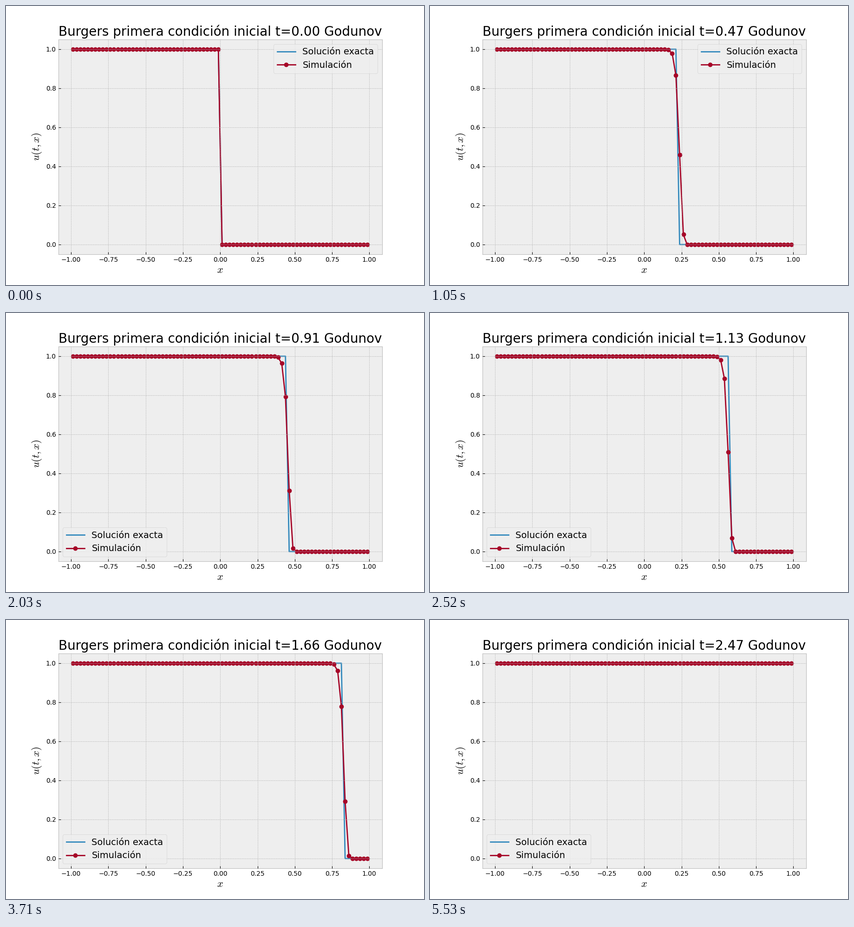
These frames come from a looping animation (900 px wide and 600 px high, 5.6 s). A matplotlib script:

```python
import numpy as np
import matplotlib.pyplot as plt
from matplotlib.animation import FuncAnimation

plt.style.use("bmh")
plt.rcParams.update({"font.family": "DejaVu Sans", "font.size": 10,
                     "axes.axisbelow": False})

CELLS, FRAMES, STEPS_PER_FRAME = 80, 80, 5
T_END = 2.5
DX = 2 / CELLS
N_STEPS = FRAMES * STEPS_PER_FRAME
RATIO = T_END / (N_STEPS + 1) / DX      # dt / dx of the scheme
times = np.linspace(0, T_END, N_STEPS)[::STEPS_PER_FRAME]
x = -1 + DX * (np.arange(CELLS) + 0.5)


def exact(t):
    """Shock travelling at speed 1/2."""
    return np.where(x < t / 2, 1.0, 0.0)


def godunov_step(u):
    """Upwind Godunov update for u >= 0 with inflow u = 1."""
    flux = np.concatenate(([1.0], u)) ** 2 / 2
    return u - RATIO * np.diff(flux)


def simulate():
    u = exact(0)
    history = []
    for _ in range(FRAMES):
        history.append(u)
        for _ in range(STEPS_PER_FRAME):
            u = godunov_step(u)
    return history


history = simulate()

fig, ax = plt.subplots(figsize=(9, 6), dpi=100, facecolor="white")
exact_line, = ax.plot(x, exact(0), label="Solución exacta")
sim_line, = ax.plot(x, history[0], "-o", label="Simulación")
margin = 0.05 * (x[-1] - x[0])
ax.set_xlim(x[0] - margin, x[-1] + margin)
ax.set_ylim(-0.05, 1.05)
ax.set_xlabel("$x$", fontsize=16)
ax.set_ylabel("$u(t,x)$", fontsize=16)
title = ax.set_title("", fontsize=20)
ax.legend(loc="best", fontsize=14)


def update(i):
    t = times[i]
    exact_line.set_ydata(exact(t))
    sim_line.set_ydata(history[i])
    title.set_text(f"Burgers primera condición inicial t={t:.2f} Godunov")
    return exact_line, sim_line, title


anim = FuncAnimation(fig, update, frames=FRAMES, interval=70,
                     repeat=True, repeat_delay=0, blit=False)
plt.show()
```
